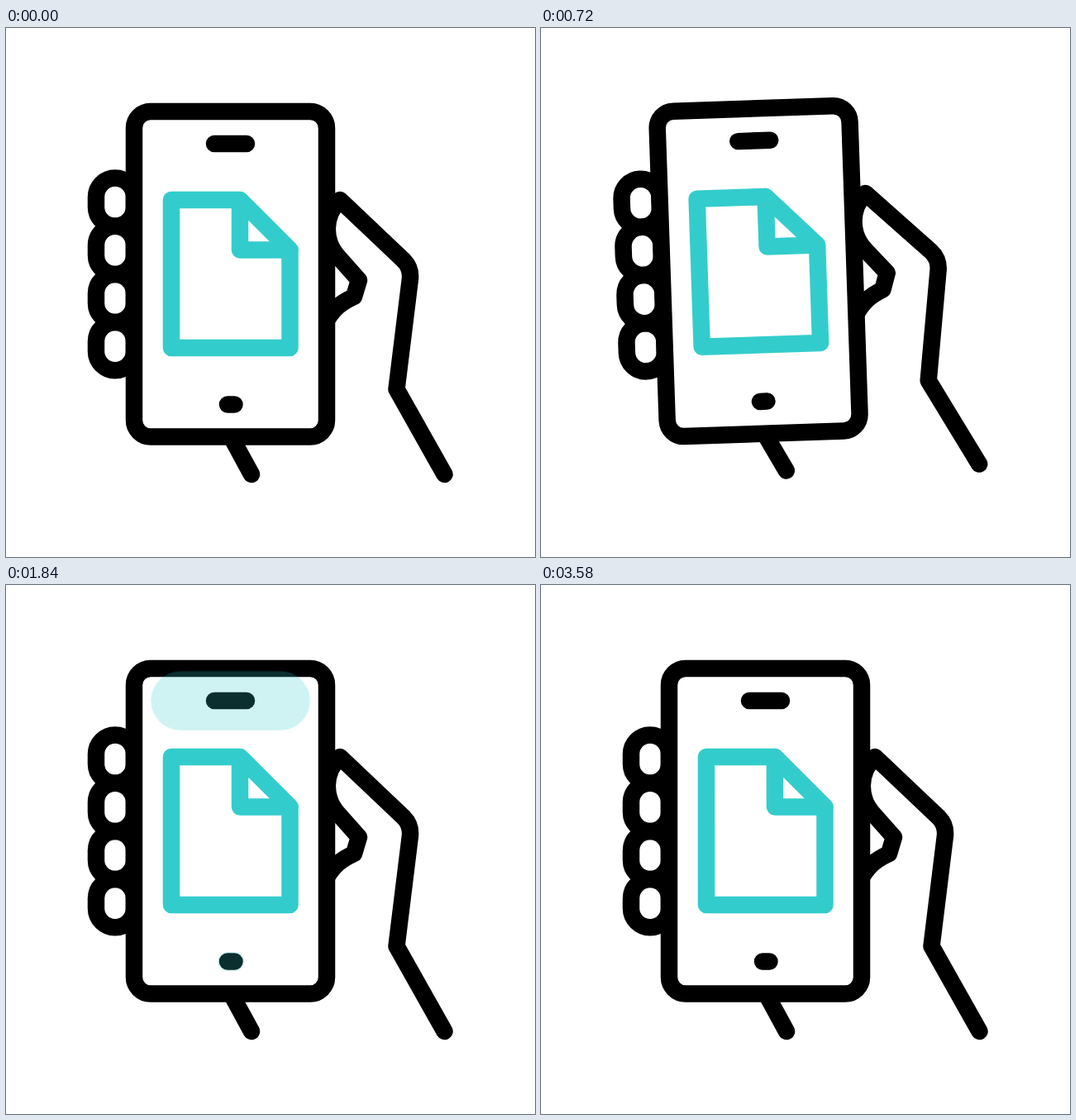
An HTML page for the animation above (3.6 s loop, 640 by 640 pixels).

```html
<!DOCTYPE html>
<html lang="en">
<head>
<meta charset="utf-8">
<title>Phone in hand</title>
<style>
  html, body { margin: 0; width: 100%; height: 100%; overflow: hidden; background: #fff; }
  svg { display: block; width: 100%; height: 100%; }
  .ink, .teal { fill: none; stroke: #000; stroke-width: 20.5; stroke-linecap: round; stroke-linejoin: round; }
  .teal { stroke: #33cccc; }
  .paper { fill: #fff; }
  .ping { stroke-width: 23; }
</style>
</head>
<body>
<svg viewBox="0 0 640 640">
  <g id="swing">
    <g id="hand" class="ink">
      <path d="M232 466 L272.5 495 L297 540"/>
      <path d="M530.5 540 L472.5 437 L489 303 Q490 290 481 281 L404 208 C385 226 383 257 403 278 L427 305 L421 325 C406 332 398 338 389 352"/>
    </g>
    <g id="fingers" class="ink"></g>
    <rect class="ink paper" x="155" y="101" width="233" height="393.5" rx="20"/>
    <path class="ink" d="M252 140 H291 M268 455.5 H276.5"/>
    <g id="glow">
      <path id="ping" class="teal ping" d="M252 140 H291"/>
      <path class="teal ping" d="M268 455.5 H276.5"/>
    </g>
    <g id="sheets">
      <rect id="back" class="ink paper"/>
      <path id="page" class="teal paper"/>
      <path id="flap" class="teal paper"/>
    </g>
  </g>
</svg>
<script>
const LOOP = 3600;
const $ = id => document.getElementById(id);
const [swing, hand, fingers, glow, ping, sheets, back, page, flap] =
  ['swing', 'hand', 'fingers', 'glow', 'ping', 'sheets', 'back', 'page', 'flap'].map($);

const set = (el, attrs) => {
  for (const k in attrs) el.setAttribute(k, attrs[k]);
};

for (let i = 0; i < 4; i++) {
  const finger = document.createElementNS('http://www.w3.org/2000/svg', 'rect');
  set(finger, { x: 109, y: 181.5 + i * 58.2, width: 46, height: 58.2, rx: 23 });
  fingers.append(finger);
}

const clamp = p => Math.min(1, Math.max(0, p));
const sine = p => (1 - Math.cos(Math.PI * clamp(p))) / 2;
const quad = p => {
  p = clamp(p);
  return p < .5 ? 2 * p * p : 1 - 2 * (1 - p) ** 2;
};

// sway of the phone from -1 to 1: ease in, two swings, ease out
function sway(t) {
  if (t < 230) return -sine(t / 230);
  if (t < 980) return -Math.cos(Math.PI * (t - 230) / 250);
  return sine((1250 - t) / 270);
}

function drawHand(t) {
  const s = sway(t);
  const down = t < 230 ? 0 : t < 980 ? (s + 1) / 2 : s;
  set(swing, { transform: `rotate(${1.95 * s} 160 544)` });
  set(hand, { transform: `translate(0 ${27 * down})` });
  set(fingers, { transform: `translate(0 ${13.5 * down})` });
}

function drawGlow(t) {
  const p = (t - 1458) / 500;
  const lit = p >= 0 && p < 1;
  set(glow, { opacity: lit ? 1 - p : 0 });
  set(ping, { transform: `translate(271.5 140) scale(${lit ? 1 + 2.75 * p : 1}) translate(-271.5 -140)` });
}

// the page tilts while its corner opens (lift), then drops off the back sheet (drop)
function drawSheets(t) {
  const W = 143.5, H = 179, FOLD = 60.5;
  const fan = quad((t - 2075) / 410) - quad((t - 3000) / 600);
  const lift = clamp(2 * fan), drop = clamp(2 * fan - 1);
  const open = 15 * (lift - drop);
  const cut = `${W - FOLD - open} 0 L${W} ${FOLD + open * .85}`;
  const tip = FOLD / 2 * drop;

  set(sheets, {
    transform: `translate(${200 - 12 * lift + 2 * drop} ${208 + lift + 28 * drop}) rotate(${-4 * lift})`
  });
  set(page, { d: `M0 0 L${cut} V${H} H0 Z` });
  set(flap, { d: `M${cut} L${W - FOLD + tip} ${FOLD - tip} Z` });
  set(back, { x: 20.5, y: 102 - 162 * fan, width: W * (.55 + .45 * fan), height: 162 * fan });
}

function draw(t) {
  drawHand(t);
  drawGlow(t);
  drawSheets(t);
}

const start = performance.now();
function tick() {
  draw((performance.now() - start) % LOOP);
  requestAnimationFrame(tick);
}
draw(0);
requestAnimationFrame(tick);
</script>
</body>
</html>
```
